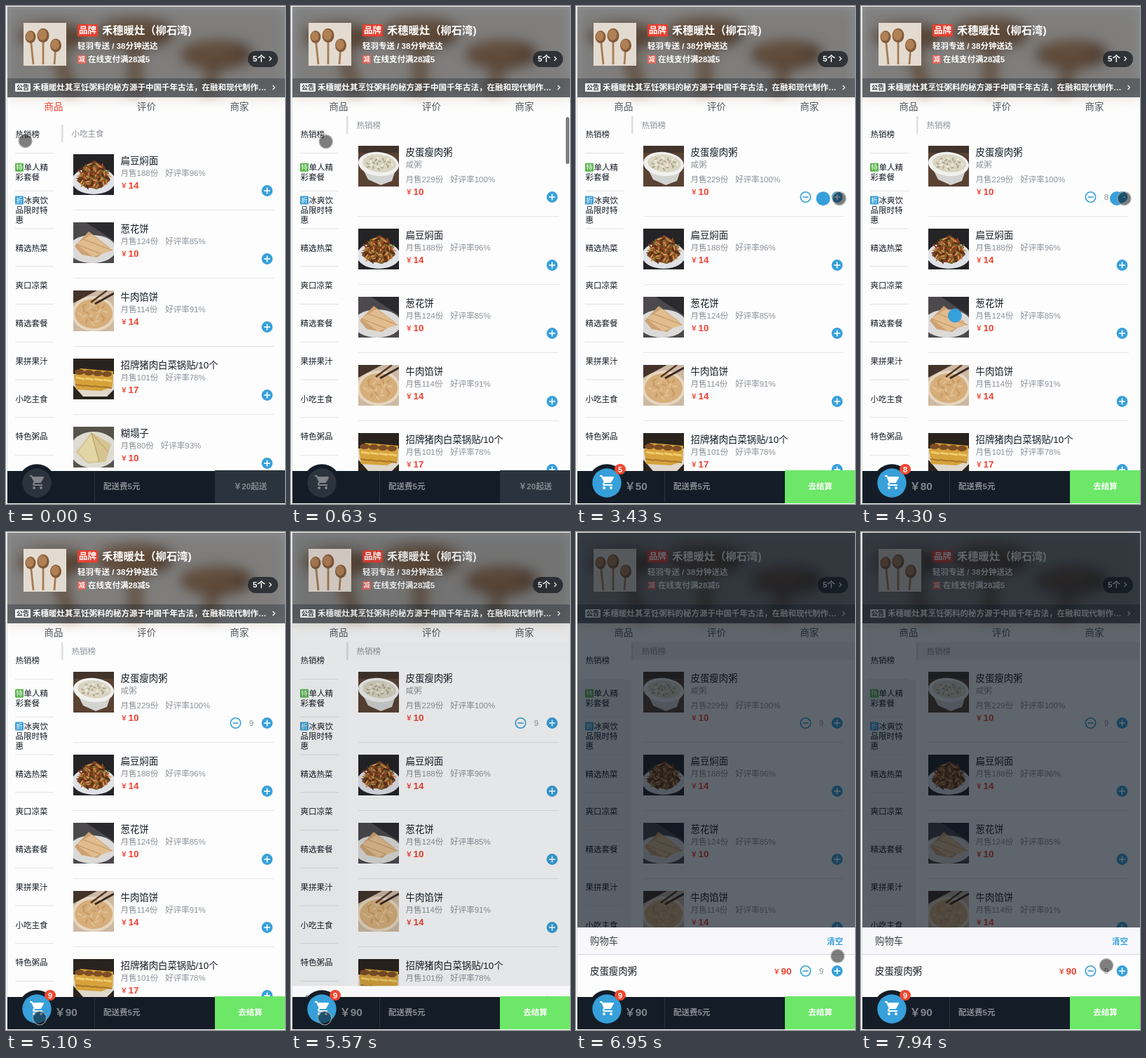
Animation of 398x709 px, one loop 8000 ms. Source, as an HTML page with a canvas:

```html
<!DOCTYPE html>
<html lang="zh-CN">
<head>
<meta charset="utf-8">
<style>
html, body { margin: 0; width: 100%; height: 100%; overflow: hidden; background: #fff; }
canvas { display: block; }
</style>
</head>
<body>
<canvas id="stage" width="398" height="709"></canvas>
<script>
const stage = document.getElementById('stage').getContext('2d');
let ctx = stage;
const FONT = '"Liberation Sans", "Noto Sans CJK SC", "Noto Sans CJK", sans-serif';
const LOOP = 8000, BLUE = '#37a0da', RED = '#ee4130', INK = '#141b24', GREY = '#8b9198', BAR = '#141d27';
const LIST_TOP = 157, BAR_TOP = 662;

// name, sold, rating, price, photo, description
const porridge = ['皮蛋瘦肉粥', 229, 100, 10, 'porridge', '咸粥'];
const noodles = ['扁豆焖面', 188, 96, 14, 'noodles'];
const scallion = ['葱花饼', 124, 85, 10, 'wedges'];
const beefPie = ['牛肉馅饼', 114, 91, 14, 'pie'];
const dumplings = ['招牌猪肉白菜锅贴/10个', 101, 78, 17, 'rolls'];
const crepe = ['糊塌子', 80, 93, 10, 'crepe'];
const pumpkin = ['南瓜粥', 91, 100, 9, 'porridge', '甜粥'];
const redBean = ['红豆薏米粥', 86, 100, 12, 'porridge', '甜粥'];
const sections = [
  ['热销榜', [porridge, noodles, scallion, beefPie, dumplings, pumpkin, redBean, crepe]],
  ['单人精彩套餐', [redBean]],
  ['冰爽饮品限时特惠', [pumpkin, redBean]],
  ['精选热菜', [noodles, dumplings, beefPie, crepe, noodles]],
  ['爽口凉菜', [noodles, crepe, scallion]],
  ['精选套餐', [redBean]],
  ['果拼果汁', [pumpkin]],
  ['小吃主食', [noodles, scallion, beefPie, dumplings, crepe]],
  ['特色粥品', [porridge, pumpkin, redBean]],
];
const rowHeight = dish => dish[5] ? 118 : 97;
let contentHeight = 0;
for (const section of sections) {
  section.top = contentHeight;
  contentHeight += 25 + section[1].reduce((sum, dish) => sum + rowHeight(dish), 0);
}
const SCROLL_START = sections[7].top - 12;

const drops = [2055, 2400, 2740, 3030, 3405, 3720, 4010, 4290, 4570];
// time, x, y of the touch point
const touch = [
  [0, 27.6, 192], [629, 27.6, 192], [630, 49.6, 193], [1410, 375.5, 274], [4600, 375.5, 274], [5100, 48, 692],
  [5600, 48, 692], [6160, 148, 501], [6220, 151, 480], [6290, 154, 481], [6800, 372, 614], [7060, 374, 597],
  [7110, 374, 597], [7410, 371, 591], [7580, 371, 591], [7650, 370, 587], [7810, 370, 587], [7940, 350, 617], [LOOP, 350, 617],
];

const clamp = v => Math.max(0, Math.min(1, v));
const progress = (t, start, length) => clamp((t - start) / length);
const smooth = p => p * p * (3 - 2 * p);
const mix = (a, b, p) => a + (b - a) * p;

function text(s, x, centerY, size, color, weight = 400, align = 'left') {
  ctx.font = `${weight} ${size}px ${FONT}`;
  ctx.textAlign = align;
  ctx.fillStyle = color;
  ctx.fillText(s, x, centerY + size * 0.37);
}
function rect(x, y, w, h, color, radius = 0) {
  ctx.fillStyle = color;
  ctx.beginPath();
  ctx.roundRect(x, y, w, h, radius);
  ctx.fill();
}
function oval(x, y, rx, ry, color, angle = 0) {
  ctx.fillStyle = color;
  ctx.beginPath();
  ctx.ellipse(x, y, rx, ry, angle, 0, 7);
  ctx.fill();
}
const disc = (x, y, r, color) => oval(x, y, r, r, color);
function ring(x, y, r, color, width) {
  ctx.strokeStyle = color;
  ctx.lineWidth = width;
  ctx.beginPath();
  ctx.arc(x, y, r, 0, 7);
  ctx.stroke();
}
function line(color, width, ...points) {
  ctx.strokeStyle = color;
  ctx.lineWidth = width;
  ctx.beginPath();
  for (let i = 0; i < points.length; i += 2) ctx.lineTo(points[i], points[i + 1]);
  ctx.stroke();
}
function poly(color, ...points) {
  ctx.fillStyle = color;
  ctx.beginPath();
  for (let i = 0; i < points.length; i += 2) ctx.lineTo(points[i], points[i + 1]);
  ctx.fill();
}
function clipped(x, y, w, h, draw) {
  ctx.save();
  ctx.beginPath();
  ctx.rect(x, y, w, h);
  ctx.clip();
  draw();
  ctx.restore();
}
// Draws once on a separate canvas
function cached(width, height, draw) {
  const canvas = document.createElement('canvas');
  canvas.width = width;
  canvas.height = height;
  ctx = canvas.getContext('2d');
  draw();
  ctx = stage;
  return canvas;
}
function price(value, x, y) {
  text('￥', x, y, 9.6, RED, 700);
  text(value, x + 11, y, 13.4, RED, 700);
}
function plus(x, y) {
  disc(x, y, 7.9, BLUE);
  line('#fff', 1.6, x - 4.5, y, x + 4.5, y);
  line('#fff', 1.6, x, y - 4.5, x, y + 4.5);
}
function stepper(y, count, reveal) {
  if (reveal > 0) {
    ctx.save();
    ctx.globalAlpha *= reveal;
    ctx.translate(mix(351.5, 327.5, reveal), y);
    ctx.rotate((1 - reveal) * Math.PI);
    ring(0, 0, 7.2, BLUE, 1.6);
    line(BLUE, 1.6, -4, 0, 4, 0);
    ctx.restore();
    text(count, 350, y, 11.5, GREY, 400, 'center');
  }
  plus(372.5, y);
}

function specks(colors, cx, cy, rx, ry, count, length) {
  for (let i = 1; i <= count; i++) {
    const a = i * 2.4, r = Math.sqrt(i / count);
    oval(cx + Math.cos(a) * r * rx, cy + Math.sin(a) * r * ry, length, 1.1, colors[i % colors.length], i * 1.7);
  }
}
const paintings = {
  porridge() {
    rect(0, 0, 58, 58, '#5a4233');
    rect(0, 0, 58, 10, '#42342b');
    poly('#d3d3d2', 3, 26, 56, 26, 48, 50, 32, 56, 14, 48);
    oval(29, 26, 29, 17, '#f0f0ee', 0.1);
    oval(30, 25, 24, 12.5, '#dad5c2', 0.1);
    specks(['#f1eddd', '#a3a585', '#b9a98d'], 30, 25, 19, 9, 22, 2.6);
  },
  noodles() {
    rect(0, 0, 58, 58, '#242326');
    oval(29, 38, 31, 19, '#dfe1e6');
    poly('#7d4423', 5, 38, 16, 18, 30, 9, 43, 17, 53, 37, 40, 48, 18, 48);
    specks(['#c08040', '#6b3a1c', '#a14a22', '#6d6a2c', '#4f2a17', '#d19a55'], 29, 31, 22, 18, 90, 4);
  },
  wedges() {
    rect(0, 0, 58, 58, '#4b494c');
    poly('#2b2a2e', 18, 0, 58, 0, 58, 26);
    oval(27, 38, 34, 20, '#dcdad8');
    poly('#cda172', 2, 34, 22, 13, 52, 36, 34, 50, 12, 46);
    poly('#e0bc8e', 4, 31, 26, 17, 56, 40, 28, 49);
    line('#bd8f5c', 1, 4, 31, 40, 45);
    line('#bd8f5c', 1, 14, 24, 56, 40);
  },
  pie() {
    rect(0, 0, 58, 58, '#cdb8a2');
    poly('#43332b', 0, 0, 34, 0, 0, 18);
    oval(29, 33, 31, 25, '#e6d6c0');
    oval(29, 33, 27, 21, '#d6ae7b');
    specks(['#c69860', '#e2c294'], 29, 33, 21, 15, 20, 4);
    line('#3a2922', 3, 58, 4, 31, 19);
    line('#523729', 2.5, 48, 0, 25, 17);
  },
  rolls() {
    rect(0, 0, 58, 58, '#2a231d');
    poly('#dfd8cb', 0, 38, 14, 54, 48, 54, 58, 44, 58, 22, 0, 22);
    poly('#d6a23c', 1, 24, 10, 14, 57, 18, 56, 40, 40, 46, 4, 44);
    for (let i = 0; i < 4; i++) {
      oval(9 + i * 13, 19 + i, 7, 4, '#7d4d25');
      line('#f0cc6a', 3, 4 + i * 13, 27 + i, 16 + i * 13, 29 + i);
      line('#a8742a', 2, 3 + i * 13, 37 + i, 16 + i * 13, 39 + i);
    }
  },
  crepe() {
    rect(0, 0, 58, 58, '#55534c');
    oval(29, 33, 34, 26, '#dddbd2');
    poly('#d5c48f', 4, 36, 26, 8, 54, 25, 46, 50, 20, 52);
    poly('#e2d5a6', 7, 36, 26, 11, 36, 49, 20, 50);
    line('#b39c5e', 1, 26, 9, 37, 50);
    line('#b39c5e', 1, 26, 9, 50, 36);
  },
};
const photos = {};
for (const kind in paintings) photos[kind] = cached(58, 58, paintings[kind]);

const spoons = cached(61, 61, () => {
  rect(0, 0, 61, 61, '#e4dbd0');
  for (const [x, y, r, tilt] of [[10, 20, 7.5, 4], [28, 18, 8.5, 0], [46, 32, 8, -2]]) {
    line('#a67c54', 2.8, x, y, x + tilt, 59);
    oval(x, y, r, r * 1.2, '#835a39');
    oval(x - 1, y - 1, r * 0.75, r * 0.9, '#b08055');
  }
});
// The shop photo, stretched and blurred, spills a little past the header's lower edge
const backdrop = cached(398, 150, () => {
  ctx.filter = 'blur(9px)';
  ctx.drawImage(spoons, 2, 1, 396, 129);
});

function drawHeader() {
  ctx.drawImage(backdrop, 0, 0);
  rect(2, 1, 396, 129, 'rgba(7,17,27,.46)');
  rect(2, 103, 396, 27, 'rgba(7,17,27,.3)');
  ctx.drawImage(spoons, 25, 24);
  rect(102, 26, 29, 17.5, '#e8402f', 2);
  text('品牌', 116.5, 34.7, 12.5, '#fff', 700, 'center');
  text('禾穗暖灶（柳石湾)', 137, 34.7, 15.3, '#fff', 700);
  text('轻羽专送 / 38分钟送达', 102, 56.8, 11.5, '#fff', 700);
  rect(102, 70, 12, 12, '#e4685c', 1);
  text('减', 108, 76, 9, '#fff', 700, 'center');
  text('在线支付满28减5', 117, 76, 11.5, '#fff', 700);
  rect(345, 64, 43, 23, 'rgba(22,27,34,.75)', 11.5);
  text('5个', 352, 75, 11.5, '#fff', 700);
  line('#fff', 1.2, 375.5, 72, 378.5, 75, 375.5, 78);
  rect(13, 110, 22, 12, '#f4f4f4', 1);
  text('公告', 24, 116, 9, '#34383d', 700, 'center');
  text('禾穗暖灶其烹饪粥料的秘方源于中国千年古法，在融和现代制作…', 38, 116, 11.5, '#fff', 700);
  line('#fff', 1.2, 380.5, 113, 383.5, 116, 380.5, 119);
}

function drawMenu(maskAmount) {
  rect(2, 210.5, 76.5, 452, `rgba(20,30,45,${0.06 * maskAmount})`);
  const labels = [['热销榜'], ['单人精', '彩套餐'], ['冰爽饮', '品限时特', '惠'], ['精选热菜'], ['爽口凉菜'],
    ['精选套餐'], ['果拼果汁'], ['小吃主食'], ['特色粥品']];
  const tags = { 1: ['特', '#56b54a'], 2: ['折', '#3b9fd6'] };
  labels.forEach((lines, i) => {
    const middle = 183 + i * 53.75;
    lines.forEach((s, k) => {
      const y = middle + (k - (lines.length - 1) / 2) * 14;
      const tag = k === 0 && tags[i];
      if (tag) {
        rect(13, y - 6, 12, 12, tag[1], 1);
        text(tag[0], 19, y, 9.5, '#fff', 400, 'center');
      }
      text(s, tag ? 25.5 : 13.5, y, 11.5, INK);
    });
    rect(13, 209 + i * 53.75, 55, 1, '#dfe2e5');
  });
}

function drawFoods(t, scroll, count, maskAmount) {
  for (const section of sections) {
    let y = LIST_TOP + section.top - scroll;
    rect(79, y, 319, 25, `rgba(20,30,45,${0.06 * maskAmount})`);
    rect(79, y, 2.5, 25, '#dadde2');
    text(section[0], 93.5, y + 13, 11.5, GREY);
    y += 42;
    section[1].forEach((dish, i) => {
      const [name, sold, rating, cost, kind, note] = dish;
      if (y > -120 && y < 720) {
        const low = y + (note ? 21 : 0);
        ctx.drawImage(photos[kind], 96, y);
        text(name, 163.5, y + 9, 13.4, INK);
        if (note) text(note, 163.5, y + 27, 11.5, GREY);
        text(`月售${sold}份`, 163.5, low + 26.5, 11.5, GREY);
        text(`好评率${rating}%`, 163.5 + 44.5 + String(sold).length * 6.4, low + 26.5, 11.5, GREY);
        price(cost, 163.5, low + 44);
        const chosen = section === sections[0] && i === 0;
        stepper(low + 52, count, chosen ? progress(t, 1440, 330) : 0);
        if (i < section[1].length - 1) rect(96, low + 79, 286, 1, '#e3e5e8');
      }
      y += rowHeight(dish);
    });
  }
}

function drawCartList(p, count) {
  ctx.translate(0, (1 - p) * 98);
  rect(2, 563, 396, 99, '#fdfdfd');
  rect(2, 563, 396, 38, '#f8f8fa');
  rect(2, 601, 396, 1, '#d5d8dc');
  text('购物车', 20, 582, 13.4, '#3a4148');
  text('清空', 381, 583, 11.5, BLUE, 700, 'right');
  text('皮蛋瘦肉粥', 20, 625, 13.4, INK);
  price(count * 10, 281.5, 625);
  stepper(625, count, 1);
}

const cartIcon = new Path2D('M7 18a2 2 0 1 0 0 4a2 2 0 0 0 0-4zM1 2v2h2l3.6 7.6-1.4 2.4C4.5 15.3 5.4 17 7 17h12v-2H7.4l-.2-.4.9-1.6h7.5c.7 0 1.4-.4 1.7-1l3.6-6.5A1 1 0 0 0 20 4H5.2l-.9-2zM17 18a2 2 0 1 0 0 4a2 2 0 0 0 0-4z');
function drawBar(count) {
  rect(2, BAR_TOP, 396, 46, BAR);
  disc(44, 679, 26.7, BAR);
  disc(44, 679, 20.7, count ? BLUE : '#2b343c');
  ctx.save();
  ctx.translate(33, 666);
  ctx.fillStyle = count ? '#fff' : '#80858a';
  ctx.fill(cartIcon);
  ctx.restore();
  if (count) {
    rect(55, 652, 16, 15, '#ee4830', 7.5);
    text(count, 63, 659.5, 11, '#fff', 700, 'center');
    text('￥' + count * 10, 69.5, 683.5, 15.3, '#80868c', 700);
  }
  rect(126, 662, 1, 45, '#2b343d');
  text('配送费5元', 139, 684, 11.5, '#8b9096', 700);
  const ready = count >= 2;
  rect(298, BAR_TOP - 1, 100, 47, ready ? '#6de768' : '#2b343c');
  text(ready ? '去结算' : '￥20起送', 348.5, 684, 11.5, ready ? '#fff' : '#858b90', 700, 'center');
}

function drawBalls(t) {
  for (const start of drops) {
    const p = (t - start) / 400;
    if (p >= 0 && p < 1) disc(mix(374, 44, p), mix(274, 687, p ** 2.85), 10, BLUE);
  }
}

function drawTouch(t) {
  const i = touch.findIndex(key => key[0] > t);
  const [t0, x0, y0] = touch[i - 1], [t1, x1, y1] = touch[i];
  const linear = (t - t0) / (t1 - t0), p = (linear + smooth(linear)) / 2;
  const x = mix(x0, x1, p), y = mix(y0, y1, p);
  disc(x, y, 9.3, 'rgba(0,0,0,.5)');
  ring(x, y, 9.6, 'rgba(165,165,165,.75)', 1.3);
}

function draw(t) {
  const scroll = SCROLL_START * (1 - progress(t, 50, 390)) ** 4;
  const inCart = drops.filter(start => t >= start - 45).length;
  const open = smooth(progress(t, 5450, 500));

  rect(0, 0, 398, 709, '#fff');
  rect(2, 1, 396, 707, '#fdfdfd');
  rect(1, 1, 1, 707, '#dcdee0');
  drawHeader();
  ['商品', '评价', '商家'].forEach((s, i) =>
    text(s, 68 + i * 132.5, 143.5, 13.4, i === 0 && t < 50 ? RED : '#4d555d', 400, 'center'));

  clipped(2, LIST_TOP, 396, BAR_TOP - LIST_TOP, () => {
    drawMenu(open);
    drawFoods(t, scroll, Math.max(1, inCart), open);
    if (t >= 50) {
      const fade = 1 - progress(t, 800, 250);
      rect(392, 158 + scroll / contentHeight * 503, 5, 67, `rgba(0,0,0,${0.5 * fade})`, 2.5);
    }
  });

  if (open > 0) {
    rect(2, 1, 396, BAR_TOP - 1, `rgba(7,17,27,${0.64 * open})`);
    clipped(2, LIST_TOP, 396, BAR_TOP - LIST_TOP, () => drawCartList(open, inCart));
  }
  drawBar(inCart);
  drawBalls(t);
  drawTouch(t);
}

const begin = performance.now();
function frame() {
  draw((performance.now() - begin) % LOOP);
  requestAnimationFrame(frame);
}
frame();
</script>
</body>
</html>
```
